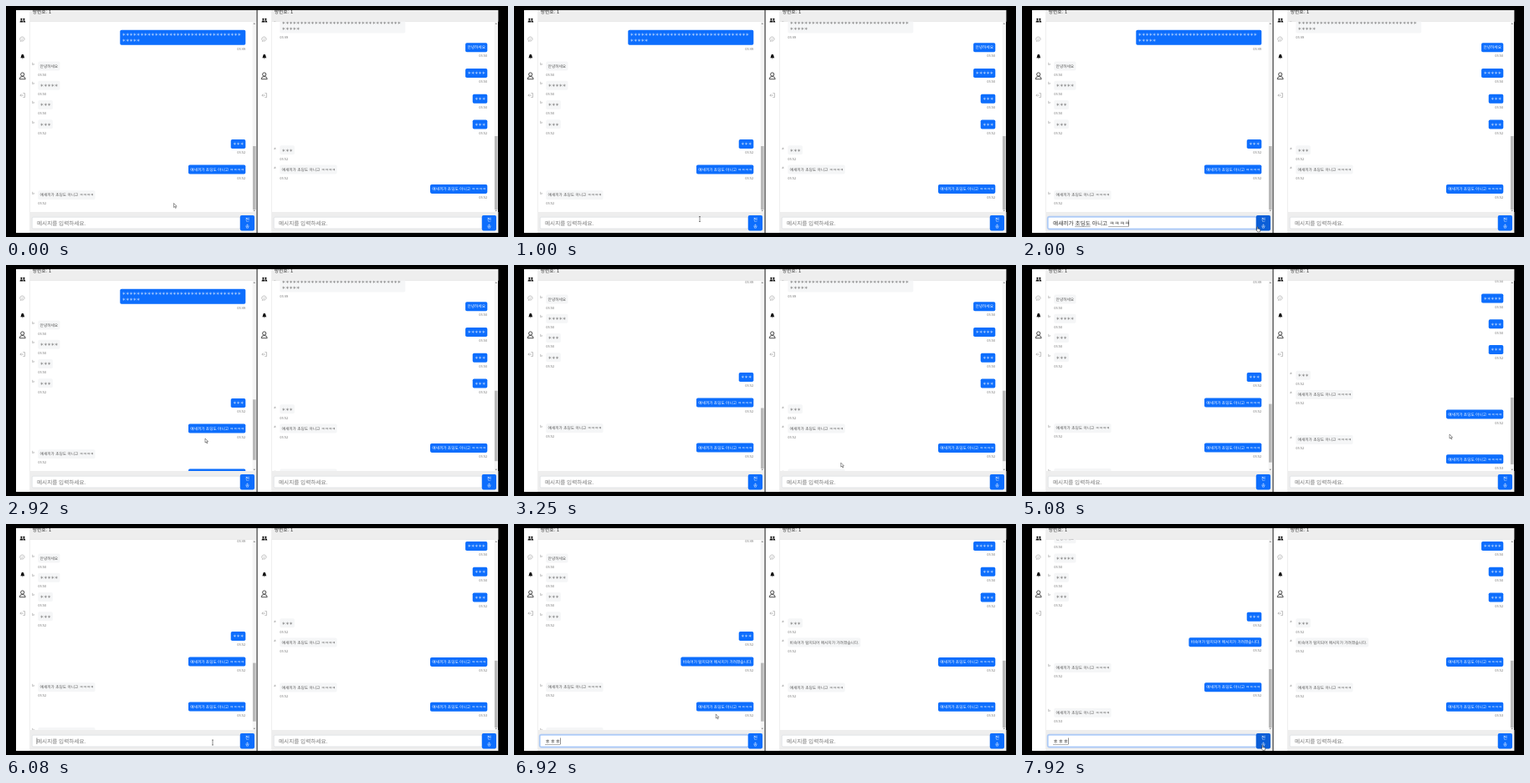
An HTML page that plays this animation: 600 by 277 pixels, repeating every 8 s.

```html
<!DOCTYPE html>
<html lang="ko">
<head>
<meta charset="utf-8">
<style>
html, body { margin: 0; width: 100%; height: 100%; overflow: hidden; background: #000; }
svg { display: block; width: 600px; height: 277px; }
text {
  font-family: "Noto Sans CJK KR", "Noto Sans CJK", "Noto Sans", sans-serif;
  text-rendering: geometricPrecision; white-space: pre;
}
</style>
</head>
<body>
<svg id="stage" viewBox="0 0 600 277"></svg>
<script>
const LOOP = 8000, GAP = 289, BLUE = '#0d6efd';
const SEND_A = 2100, SEND_B = 4550, SWAP = 6750;
const LINE = '얘새끼가 초딩도 아니고 ㅋㅋㅋㅋ', MASKED = '비속어가 탐지되어 메시지가 가려졌습니다.';
const stars = n => '＊'.repeat(n);

// centre y, text, time, sent by this pane, appears at, masked at
const panes = [
  {
    name: 'b', content: 646, base: 423, growth: [[SEND_A, 31], [SEND_B, 23]],
    messages: [
      [37.7, stars(38), '05:49', 1], [72, '안녕하세요', '05:50', 0], [95.3, stars(5), '05:50', 0],
      [118.5, stars(3), '05:50', 0], [141.8, stars(3), '05:52', 0], [165.5, stars(3), '05:52', 1],
      [196, LINE, '05:52', 1, 0, SWAP], [226.7, LINE, '05:52', 0],
      [250, LINE, '05:52', 1, SEND_A], [280.5, LINE, '05:53', 0, SEND_B]
    ]
  },
  {
    name: 'a', content: 559, base: 336, growth: [[SEND_A, 23], [SEND_B, 31]],
    messages: [
      [23.5, stars(38), '05:49', 0], [49.7, '안녕하세요', '05:50', 1], [80.5, stars(5), '05:50', 1],
      [111.3, stars(3), '05:50', 1], [142, stars(3), '05:52', 1], [172.8, stars(3), '05:52', 0],
      [196, LINE, '05:52', 0, 0, SWAP], [219.4, LINE, '05:52', 1],
      [250, LINE, '05:52', 0, SEND_A], [273.3, LINE, '05:53', 1, SEND_B]
    ]
  }
];

// time, x, y of the pointer
const pointer = [
  [0, 200.5, 236.5], [80, 200.5, 236.5], [330, 196, 255.5], [830, 196, 255.5], [1000, 222, 255.5],
  [1500, 222, 256], [1900, 281.5, 264.5], [2160, 281.5, 264.5], [2750, 238, 208], [3000, 238, 208],
  [3450, 500, 258], [3670, 500, 258], [4080, 538, 255], [4200, 538, 255], [4400, 575, 264],
  [4600, 575, 264], [4900, 511, 203], [5350, 511, 203], [5950, 247, 262], [6700, 247, 262],
  [7000, 240, 220], [7300, 240, 220], [7750, 286, 260], [7920, 287.5, 265], [LOOP, 287.5, 265]
];

const ramp = (t, a, b) => {
  const k = Math.min(1, Math.max(0, (t - a) / (b - a)));
  return k * k * (3 - 2 * k);
};
const between = (t, a, b) => t >= a && t < b;
const em = s => [...s].reduce((sum, c) => sum + (c === ' ' ? .224 : c === '.' ? .28 : .92), 0);

const rect = (x, y, w, h, fill, extra = '') =>
  `<rect x="${x}" y="${y}" width="${w}" height="${h}" fill="${fill}" ${extra}/>`;
const text = (x, y, size, fill, s, extra = '') =>
  `<text x="${x}" y="${y}" font-size="${size}" fill="${fill}" ${extra}>${s}</text>`;
const path = (d, fill, stroke = 'none', width = .7) =>
  `<path d="${d}" fill="${fill}" stroke="${stroke}" stroke-width="${width}"/>`;

function bubble([y, body, time, mine, from = 0, masked = LOOP], t, name) {
  if (t < from) return '';
  if (t >= masked) body = MASKED;
  const lines = body.length > 33 && body[0] === '＊' ? [body.slice(0, 33), body.slice(33)] : [body];
  const w = lines[1] ? 150 : em(body) * 4.7 + 4.6;
  const h = 4 + 7 * lines.length, x = mine ? 286.3 - w : 38.3;
  const spacing = body[0] === '＊' ? 'letter-spacing="-.376"' : '';
  let s = rect(x, y - h / 2, w, h, mine ? BLUE : '#f5f6f7', 'rx="1.8"');
  lines.forEach((line, i) => {
    s += text(x + 2.3, y + 1.7 + 7 * (i - (lines.length - 1) / 2), 4.7, mine ? '#fff' : '#555', line, spacing);
  });
  s += text(mine ? 286.3 : 38.3, y + h / 2 + 6.2, 4, '#777', time, mine ? 'text-anchor="end"' : '');
  return mine ? s : s + text(31.3, y - h / 2 + 4.4, 4, '#777', name);
}

const sidebar =
  '<circle cx="18.4" cy="15.8" r="1.1"/><circle cx="21.4" cy="15.8" r="1.1"/>' +
  path('M16.5 19.4q0-2.2 1.9-2.2t1.9 2.2zM20.7 19.4q0-1.3-.6-2 3.2-.8 3.2 2z', '#111') +
  path('M17.6 41.4l-.3 1 1.2-.5a2.7 2.5 0 1 0-.9-.5z', 'none', '#999', .6) +
  path('M18.4 39.2h2.8M18.4 40.3h2', 'none', '#aaa', .4) +
  path('M17.2 62.2q.9-.6.9-2.2 0-2.1 1.7-2.3 1.7.2 1.7 2.3 0 1.6.9 2.2zM19 62.7h1.6q-.8 1.2-1.6 0z', '#111') +
  '<circle cx="19.7" cy="82" r="2.1" fill="none" stroke="#222" stroke-width=".8"/>' +
  path('M16.2 87.7q0-3.2 3.5-3.2t3.5 3.2z', 'none', '#222', .8) +
  path('M20.3 104.6h2.2v5h-2.2M21 107.1h-4M18.3 105.6l-1.5 1.5 1.5 1.5', 'none', '#999', .6);

function field(value, focus, caret) {
  let s = focus ? rect(30.6, 252.6, 250, 15, 'none', 'rx="2" stroke="#0d6efd" stroke-opacity=".25" stroke-width="1.6"') : '';
  s += rect(31.2, 253.2, 248.8, 13.8, '#fff', `rx="1.6" stroke="${focus ? '#86b7fe' : '#d5d9dd'}" stroke-width=".6"`);
  s += value ? text(37, 262.6, 6.7, '#333', value) : text(37, 262.6, 6.6, '#777', '메시지를 입력하세요.');
  for (const word of ['초딩도', 'ㅋㅋㅋㅋ', 'ㅎㅎㅎ']) {
    const at = value.indexOf(word);
    if (at >= 0) s += rect(37 + em(value.slice(0, at)) * 6.7, 264, em(word) * 6.7, .5, '#666');
  }
  return caret ? s + rect(37 + em(value) * 6.7 - .3, 256.5, .5, 7.5, '#222') : s;
}

function pane(p, i, t, scroll, input, hover) {
  const content = p.content + p.growth.reduce((sum, [at, h]) => sum + (t >= at ? h : 0), 0);
  const k = 223 / content;
  return `<g transform="translate(${GAP * i})">` +
    rect(i ? 11.5 : 12, 5, i ? 287.5 : 288, 267, '#fff') + sidebar +
    rect(28, 5, .6, 267, '#e4e4e4') +
    rect(28.4, 5, 271, 13.5, '#eee') +
    text(31.7, 8.6, 5.8, '#333', '방번호: 1', 'clip-path="url(#window)"') +
    rect(28.4, 18, 271, .5, '#ddd') +
    `<g clip-path="url(#chat)"><g transform="translate(0 ${-scroll})">` +
    p.messages.map(m => bubble(m, t, p.name)).join('') + '</g></g>' +
    rect(294.6, 18.5, 4.4, 228.5, '#f4f4f4') +
    path('M295.6 21.8l1.2-1.5 1.2 1.5zM295.6 244.7l1.2 1.5 1.2-1.5z', '#777') +
    rect(295, 22 + (p.base + scroll) * k, 3.6, 223 * k - 1, '#b9b9b9') +
    rect(28.4, 247, 271, 25, '#eee') + field(...input) +
    rect(279.8, 251, 17.2, 18.4, hover ? '#0b5ed7' : BLUE, 'rx="1.8"') +
    text(288.4, 258.4, 5.4, '#fff', '전', 'text-anchor="middle"') +
    text(288.4, 265.8, 5.4, '#fff', '송', 'text-anchor="middle"') + '</g>';
}

function pointerAt(t) {
  const n = pointer.findIndex(p => p[0] > t);
  const [a, x, y] = pointer[n - 1], [b, u, v] = pointer[n], k = ramp(t, a, b);
  return [x + (u - x) * k, y + (v - y) * k];
}

function drawPointer(x, y, overButton) {
  const px = x > 300 ? x - GAP : x;
  const shape = overButton
    ? path('M-.6 3.6V.5q.5-.9 1 0v2l2.4.6q.7.2.5 1.2L2.8 6.4H.3L-1.7 4q.2-.8 1.1 0z', '#fff', '#111', .5)
    : y > 253 && y < 267 && px > 31 && px < 280
      ? path('M-1-3h2M0-3v6M-1 3h2', 'none', '#444', .6)
      : path('M0 0v5l1.2-1 .9 2 .8-.4-.9-1.9h1.6z', '#fff', '#333', .5);
  return `<g transform="translate(${x} ${y})">${shape}</g>`;
}

const defs = '<defs><clipPath id="chat"><path d="M28.6 18.5H294.6V247H28.6z"/></clipPath>' +
  '<clipPath id="window"><path d="M12 5H300V272H12z"/></clipPath></defs>';

function draw(t) {
  const [x, y] = pointerAt(t);
  const over = i => y > 251 && y < 269.5 && between(x - GAP * i, 279.8, 297);
  const typed = between(t, 1500, SEND_A) ? LINE
    : t > 6300 ? 'ㅎㅎㅎ'.slice(0, Math.floor((t - 6300) / 150) + 1) : '';
  const leftCaret = between(t, 1170, SEND_A) || t >= 6040;
  const rightFocus = between(t, 3500, SEND_B);
  const inputs = [
    [typed, leftCaret && !between(t, 6040, 6150), leftCaret],
    [between(t, 3750, SEND_B) ? LINE : '', rightFocus, rightFocus]
  ];
  const scrolls = [
    31 * ramp(t, 3000, 3250) + 23.3 * ramp(t, 7050, 7300),
    40.5 * ramp(t, 4800, 5000) + 13.5 * ramp(t, 5330, 5500)
  ];
  stage.innerHTML = defs + rect(0, 0, 600, 277, '#000') +
    panes.map((p, i) => pane(p, i, t, scrolls[i], inputs[i], over(i))).join('') +
    rect(299.2, 5, 1.4, 267, '#777') + drawPointer(x, y, over(0) || over(1));
}

const stage = document.getElementById('stage');
const FPS = 12;
let last = -1;
function tick() {
  const step = Math.floor((performance.now() % LOOP) * FPS / 1000 + .05) % (LOOP * FPS / 1000);
  if (step !== last) draw((last = step) * 1000 / FPS);
  requestAnimationFrame(tick);
}
tick();
</script>
</body>
</html>
```
